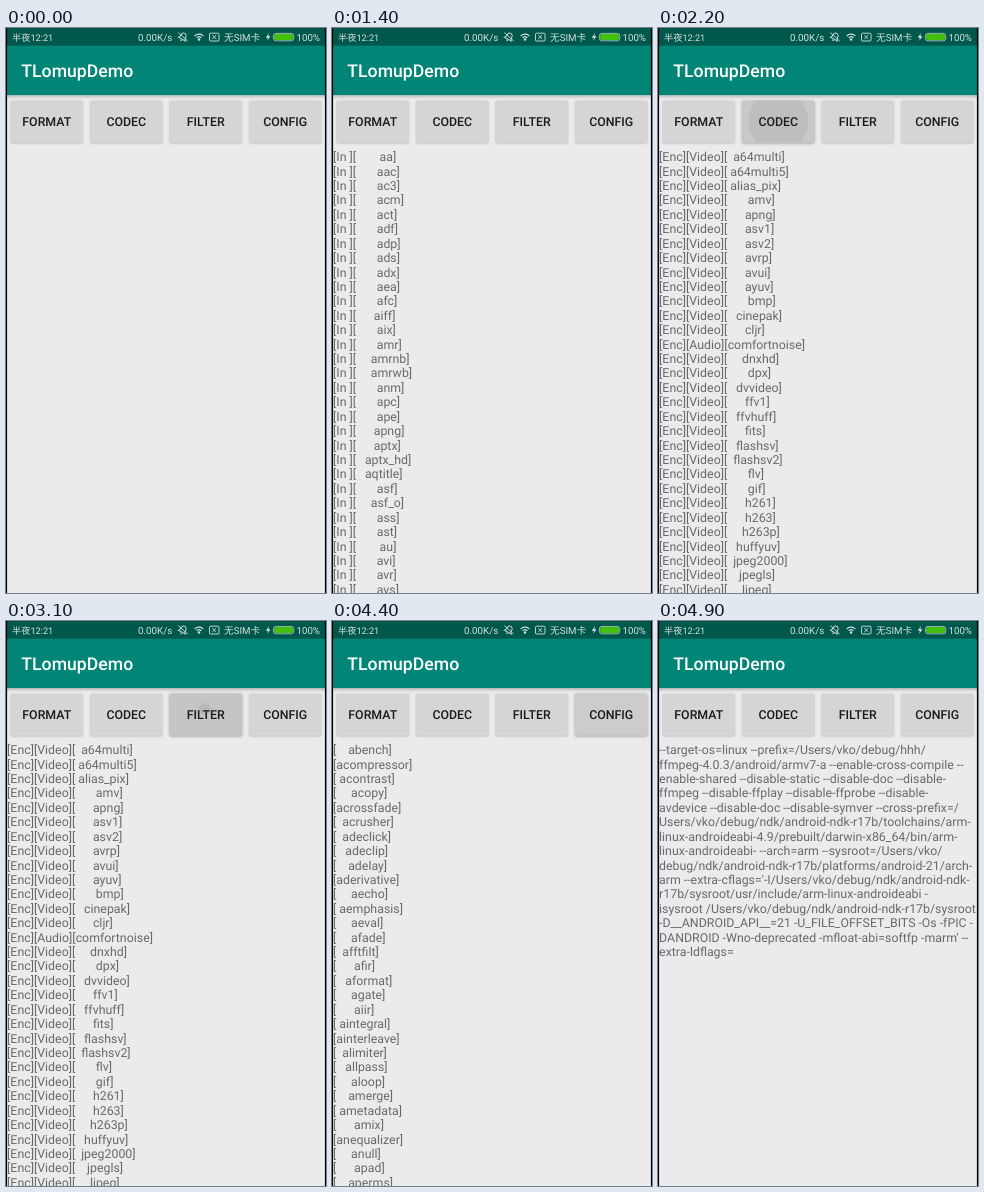
These frames come from a looping animation (320x565 px, 7900 ms). An HTML page with a canvas:

```html
<!DOCTYPE html>
<html lang="en">
<head>
<meta charset="utf-8">
<title>Codec browser</title>
<style>
html, body { margin: 0; width: 100%; height: 100%; overflow: hidden; background: #000; }
canvas { display: block; width: 320px; height: 565px; }
</style>
</head>
<body>
<canvas id="stage"></canvas>
<script>
const W = 320, H = 565, LOOP = 7900, STEP = 100;
const DP = H / 640;               // one Android dp in stage pixels
const PX = DP / 3;                // one pixel of the phone screen
const LEFT = (W - 360 * DP) / 2;
const BAR_TOP = 20 * DP, BAR_BOTTOM = 76 * DP;
const SANS = 'Roboto, "Noto Sans CJK SC", "Noto Sans CJK", sans-serif';

const canvas = document.getElementById('stage');
const ctx = canvas.getContext('2d');
const ratio = window.devicePixelRatio || 1;
canvas.width = W * ratio;
canvas.height = H * ratio;
ctx.textRendering = 'geometricPrecision';

const pad = name => name.padStart(10);
const formats = ('aa aac ac3 acm act adf adp ads adx aea afc aiff aix amr amrnb amrwb anm apc ape apng ' +
  'aptx aptx_hd aqtitle asf asf_o ass ast au avi avr avs').split(' ').map(n => `[In ][${pad(n)}]`);
const codecs = ('a64multi a64multi5 alias_pix amv apng asv1 asv2 avrp avui ayuv bmp cinepak cljr comfortnoise ' +
  'dnxhd dpx dvvideo ffv1 ffvhuff fits flashsv flashsv2 flv gif h261 h263 h263p huffyuv jpeg2000 jpegls ljpeg')
  .split(' ').map(n => `[Enc][${n === 'comfortnoise' ? 'Audio' : 'Video'}][${pad(n)}]`);
const filters = ('abench acompressor acontrast acopy acrossfade acrusher adeclick adeclip adelay aderivative ' +
  'aecho aemphasis aeval afade afftfilt afir aformat agate aiir aintegral ainterleave alimiter allpass aloop ' +
  'amerge ametadata amix anequalizer anull apad aperms').split(' ').map(n => `[${pad(n)}]`);
const config = `--target-os=linux --prefix=/Users/vko/debug/hhh/
ffmpeg-4.0.3/android/armv7-a --enable-cross-compile --
enable-shared --disable-static --disable-doc --disable-
ffmpeg --disable-ffplay --disable-ffprobe --disable-
avdevice --disable-doc --disable-symver --cross-prefix=/
Users/vko/debug/ndk/android-ndk-r17b/toolchains/arm-
linux-androideabi-4.9/prebuilt/darwin-x86_64/bin/arm-
linux-androideabi- --arch=arm --sysroot=/Users/vko/
debug/ndk/android-ndk-r17b/platforms/android-21/arch-
arm --extra-cflags='-I/Users/vko/debug/ndk/android-ndk-
r17b/sysroot/usr/include/arm-linux-androideabi -
isysroot /Users/vko/debug/ndk/android-ndk-r17b/sysroot
-D__ANDROID_API__=21 -U_FILE_OFFSET_BITS -Os -fPIC -
DANDROID -Wno-deprecated -mfloat-abi=softfp -marm' --
extra-ldflags=`.split('\n');

const buttons = [
  { label: 'FORMAT', press: 900, lines: formats, touch: [42, 81], spread: 30 },
  { label: 'CODEC', press: 2000, lines: codecs, touch: [119, 88], spread: 30 },
  { label: 'FILTER', press: 3000, lines: filters, touch: [199, 88], spread: 37 },
  { label: 'CONFIG', press: 4400, lines: config, touch: [279, 88], spread: 32 }
];
const SHOW_DELAY = 200;
const IDLE = '#d5d5d5';
const PRESSED = ['#cccccc', '#c5c5c5', '#c8c8c8', '#c8c8c8', '#cecece'];

// Text is laid out in phone pixels, where a space is a whole number wide.
function text(str, x, y, size, color, weight = 400, align = 'left') {
  ctx.save();
  ctx.translate(x, y);
  ctx.scale(PX, PX);
  ctx.font = `${weight} ${size / PX}px ${SANS}`;
  const space = ctx.measureText(' ').width;
  ctx.wordSpacing = `${Math.round(space) - space}px`;
  ctx.textAlign = align;
  ctx.fillStyle = color;
  ctx.fillText(str, 0, 0);
  ctx.restore();
}

function rect(x, y, w, h, color) {
  ctx.fillStyle = color;
  ctx.fillRect(x, y, w, h);
}

function roundRect(x, y, w, h, r) {
  ctx.beginPath();
  ctx.moveTo(x + r, y);
  ctx.arcTo(x + w, y, x + w, y + h, r);
  ctx.arcTo(x + w, y + h, x, y + h, r);
  ctx.arcTo(x, y + h, x, y, r);
  ctx.arcTo(x, y, x + w, y, r);
  ctx.closePath();
}

function line(...pts) {
  ctx.beginPath();
  for (let i = 0; i < pts.length; i += 2) ctx.lineTo(pts[i], pts[i + 1]);
}

function drawBell(x, y) {
  ctx.save();
  ctx.translate(x, y);
  ctx.rotate(0.5);
  ctx.beginPath();
  ctx.moveTo(-3.8, 2.6);
  ctx.quadraticCurveTo(-2.6, 1.6, -2.6, -1);
  ctx.arc(0, -1.2, 2.6, Math.PI, 0);
  ctx.quadraticCurveTo(2.6, 1.6, 3.8, 2.6);
  ctx.closePath();
  ctx.stroke();
  line(-1, 4.1, 1, 4.1);
  ctx.stroke();
  ctx.restore();
  line(x - 4.7, y - 4.2, x + 4.7, y + 4.2);
  ctx.stroke();
}

function drawStatus() {
  const ink = '#d3e2df';
  rect(0, 0, W, BAR_TOP, '#00574b');
  text('半夜12:21', 6, 12.6, 9.2, ink);
  text('0.00K/s', 132, 12.6, 9.8, ink);
  text('无SIM卡', 218, 12.6, 9.7, ink);
  text('100%', 290.5, 12.6, 9.7, ink);

  ctx.strokeStyle = ctx.fillStyle = ink;
  ctx.lineWidth = 0.9;
  drawBell(177, 8.8);
  // wifi
  ctx.lineWidth = 1.2;
  for (const r of [3, 5.7]) {
    ctx.beginPath();
    ctx.arc(193, 11.8, r, -Math.PI * 0.78, -Math.PI * 0.22);
    ctx.stroke();
  }
  ctx.beginPath();
  ctx.arc(193, 11.5, 1.2, 0, 7);
  ctx.fill();
  // missing SIM
  ctx.lineWidth = 0.9;
  roundRect(203.5, 5.2, 9.5, 7.8, 1);
  ctx.stroke();
  line(206.3, 7.2, 210.2, 11);
  ctx.stroke();
  line(210.2, 7.2, 206.3, 11);
  ctx.stroke();
  // charging bolt and battery
  line(263, 5, 259.8, 9.7, 262, 9.7, 261, 13, 264.5, 8.2, 262.3, 8.2);
  ctx.fill();
  ctx.lineWidth = 0.7;
  roundRect(267.4, 5.4, 20.4, 7.4, 2.4);
  ctx.stroke();
  roundRect(268.1, 6.1, 19, 6, 1.8);
  ctx.fillStyle = '#43c00c';
  ctx.fill();
}

function drawToolbar() {
  const shade = ctx.createLinearGradient(0, BAR_BOTTOM, 0, BAR_BOTTOM + 4);
  shade.addColorStop(0, 'rgba(0,0,0,.2)');
  shade.addColorStop(1, 'rgba(0,0,0,0)');
  rect(0, BAR_BOTTOM, W, 4, shade);
  rect(0, 0, W, BAR_BOTTOM, '#008577');
  text('TLomupDemo', 15.3, 49.2, 20 * DP, '#fff', 500);
}

function drawButton(button, i, t) {
  const cell = 90 * DP;
  const x = LEFT + i * cell + 4 * DP, y = BAR_BOTTOM + 6 * DP;
  const w = cell - 8 * DP, h = 48 * DP;
  const cx = x + w / 2;
  const step = Math.floor((t - button.press) / STEP);
  const active = step >= 0 && step < PRESSED.length;

  ctx.save();
  ctx.shadowColor = active ? 'rgba(0,0,0,.32)' : 'rgba(0,0,0,.2)';
  ctx.shadowBlur = (active ? 3 : 2) * ratio;
  ctx.shadowOffsetY = 0.8 * ratio;
  roundRect(x, y, w, h, 2 * DP);
  ctx.fillStyle = active ? PRESSED[step] : IDLE;
  ctx.fill();
  ctx.restore();

  if (step === 1 || step === 2) {
    const [rx, ry] = step === 1 ? button.touch : [cx, y + h / 2];
    ctx.save();
    roundRect(x, y, w, h, 2 * DP);
    ctx.clip();
    ctx.beginPath();
    ctx.arc(rx, ry, step === 1 ? 6 : button.spread, 0, 7);
    ctx.fillStyle = step === 1 ? '#b9b9b9' : '#bebebe';
    ctx.fill();
    ctx.restore();
  }
  text(button.label, cx, 98.3, 14 * DP, '#1a1a1a', 500, 'center');
}

function draw(t) {
  ctx.setTransform(ratio, 0, 0, ratio, 0, 0);
  rect(0, 0, W, H, t < 800 ? '#eaebec' : '#ebebeb');
  drawToolbar();
  drawStatus();
  buttons.forEach((b, i) => drawButton(b, i, t));

  const shown = buttons.filter(b => t >= b.press + SHOW_DELAY).pop();
  if (shown) {
    shown.lines.forEach((s, i) => text(s, LEFT, 133.2 + i * 49 * PX, 14 * DP, '#696969'));
  }
  rect(0, 0, LEFT, H, '#000');
  rect(W - LEFT, 0, LEFT, H, '#000');
}

const start = performance.now();
function tick() {
  draw((performance.now() - start) % LOOP);
  requestAnimationFrame(tick);
}
tick();
</script>
</body>
</html>
```
